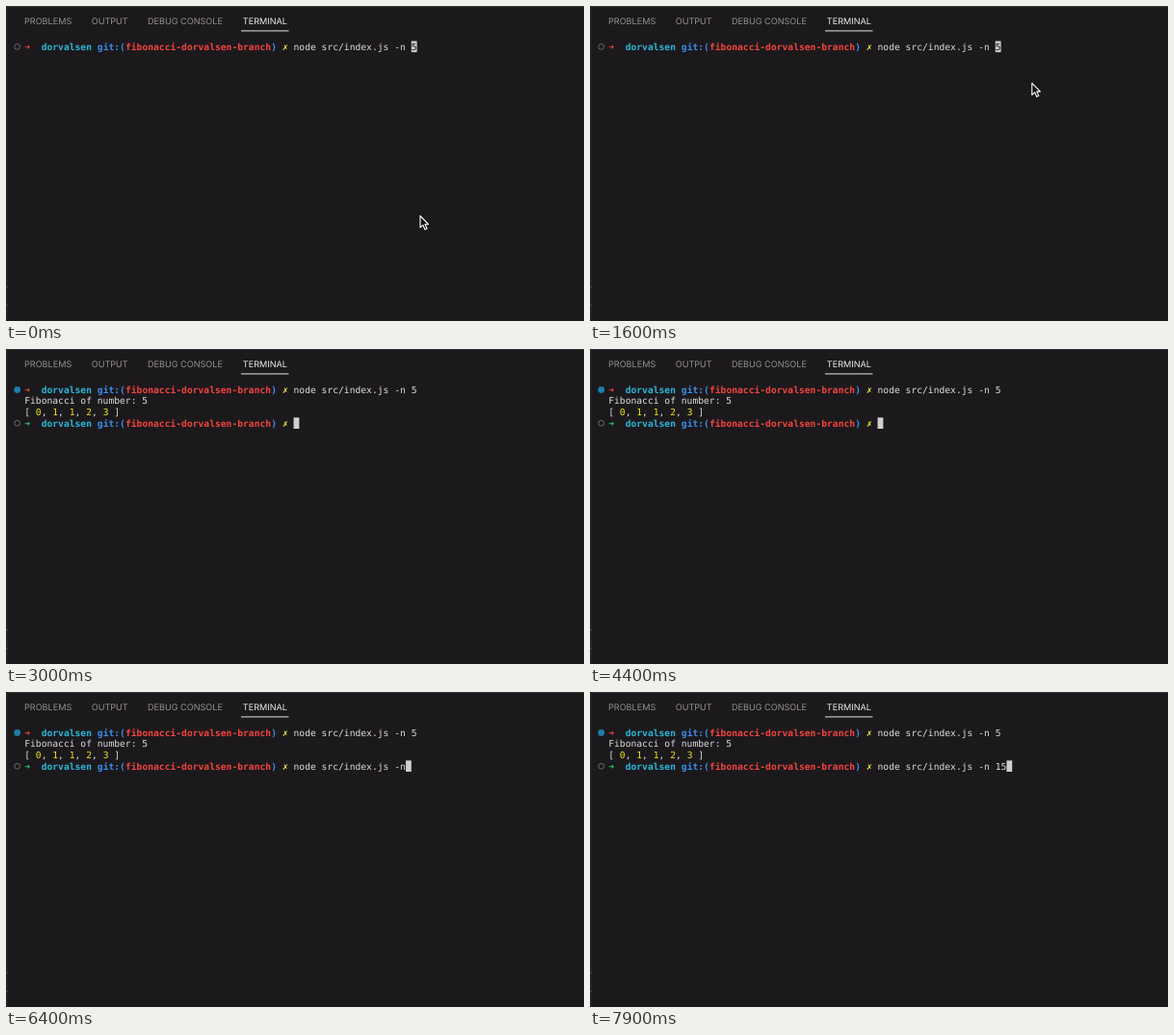
These frames come from a looping animation (600 px wide and 328 px high, 8000 ms). An HTML page:

```html
<!DOCTYPE html>
<html lang="en">
<head>
<meta charset="utf-8">
<title>Terminal</title>
<style>
html, body { margin: 0; width: 100%; height: 100%; overflow: hidden; background: #1c191c; }
svg { display: block; width: 600px; height: 328px; }
text { white-space: pre; text-rendering: geometricPrecision; }
.tab { font: 400 9.1px Inter, "Liberation Sans", sans-serif; fill: #939193; }
.tab.on { fill: #ececec; }
.mono { font: 9.667px "DejaVu Sans Mono", "Liberation Mono", monospace; fill: #dedede; }
.b { font-weight: 700; }
.red { fill: #f4443e; }
.green { fill: #1fd56f; }
.cyan { fill: #29b8db; }
.blue { fill: #3b8eea; }
.lemon { fill: #f5f543; }
.yellow { fill: #e9e51c; }
</style>
</head>
<body>
<svg viewBox="0 0 600 328">
  <rect width="600" height="328" fill="#1c191c"/>
  <rect width="600" height="1" fill="#333133"/>
  <rect width="2" height="328" fill="#242224"/>
  <path d="M0 292.5h2M0 311.5h2" stroke="#4a484a"/>
  <text class="tab" x="19" y="18.7">PROBLEMS</text>
  <text class="tab" x="88.7" y="18.7">OUTPUT</text>
  <text class="tab" x="147" y="18.7">DEBUG CONSOLE</text>
  <text class="tab on" x="245.8" y="18.7">TERMINAL</text>
  <rect x="244" y="25.4" width="49.5" height="1" fill="#e4e4e4"/>
  <g id="term"></g>
  <path id="mouse" d="M0 0V12.2L2.9 9.6L4.9 14.2L7 13.3L5 8.8H8.6Z" fill="#111" stroke="#fff" stroke-width="1.1" stroke-linejoin="round"/>
</svg>
<script>
const LOOP = 8000, TICK = 100;
const LEFT = 19.2, TOP = 36.5, COL = 5.82, ROW = 11.62;
const COMMAND = "node src/index.js -n 5";
const term = document.getElementById("term");
const mouse = document.getElementById("mouse");

// [time, command on first line, output shown, second command, cursor row, cursor column]
const STEPS = [
  [0, false, "", 0, 69],
  [2000, false, "", 0, 70],
  [2400, false, "", 1, 0],
  [2700, true, "", 3, 48],
  [4700, true, COMMAND, 3, 70],
  [5500, true, COMMAND.slice(0, -1), 3, 69],
  [5700, true, COMMAND.slice(0, -2), 3, 68],
  [7000, true, "node src/index.js -n ", 3, 69],
  [7200, true, "node src/index.js -n 1", 3, 70],
  [7400, true, "node src/index.js -n 15", 3, 71]
];
const MOUSE = { from: [430, 218.5], to: [458.8, 80.3], end: 600, hide: 2000 };

const colX = c => LEFT + c * COL;
const rowY = r => TOP + r * ROW;

function put(row, col, str, cls = "") {
  return `<text class="mono ${cls}" x="${colX(col).toFixed(2)}" y="${(rowY(row) + 9.2).toFixed(2)}">${str}</text>`;
}

function dot(row, done) {
  const look = done ? 'r="3.4" fill="#1c7fac"' : 'r="2.9" fill="none" stroke="#757375" stroke-width=".9"';
  return `<circle cx="11.7" cy="${rowY(row) + 5.9}" ${look}/>`;
}

function prompt(row, arrow, done, cmd) {
  return dot(row, done) +
    put(row, 0, "➜", "b " + arrow) +
    put(row, 3, "dorvalsen", "b cyan") +
    put(row, 13, "git:(", "b blue") +
    put(row, 18, "fibonacci-dorvalsen-branch", "b red") +
    put(row, 44, ")", "b blue") +
    put(row, 46, "✗", "b lemon") +
    put(row, 48, cmd);
}

function output() {
  const list = [0, 1, 1, 2, 3];
  return put(1, 0, "Fibonacci of number: 5") +
    put(2, 0, "[  ,  ,  ,  ,   ]".replace(/,   \]/, ",   ]")) +
    list.map((n, i) => put(2, 2 + 3 * i, n, "yellow")).join("");
}

function cursor(row, col) {
  const box = `<rect x="${colX(col)}" y="${rowY(row)}" width="${COL}" height="${ROW}" fill="#cfcfcf"/>`;
  const under = row === 0 && col === 69 ? `<g style="--f:0">${put(0, 69, "5").replace("<text", '<text style="fill:#1c191c"')}</g>` : "";
  return box + under;
}

let shown = null;
function draw(now) {
  const t = Math.floor((now % LOOP) / TICK) * TICK;
  const step = STEPS.filter(s => s[0] <= t).pop();
  if (step !== shown) {
    shown = step;
    const [, done, typed, row, col] = step;
    term.innerHTML = prompt(0, "red", done, COMMAND) +
      (done ? output() + prompt(3, "green", false, typed) : "") +
      cursor(row, col);
  }
  const p = Math.min(t / MOUSE.end, 1);
  const e = p * p * (3 - 2 * p);
  const [x, y] = MOUSE.from.map((a, i) => a + (MOUSE.to[i] - a) * e);
  mouse.setAttribute("transform", `translate(${x} ${y})`);
  mouse.style.display = t < MOUSE.hide ? "" : "none";
}

function frame() {
  draw(performance.now());
  requestAnimationFrame(frame);
}
frame();
</script>
</body>
</html>
```
